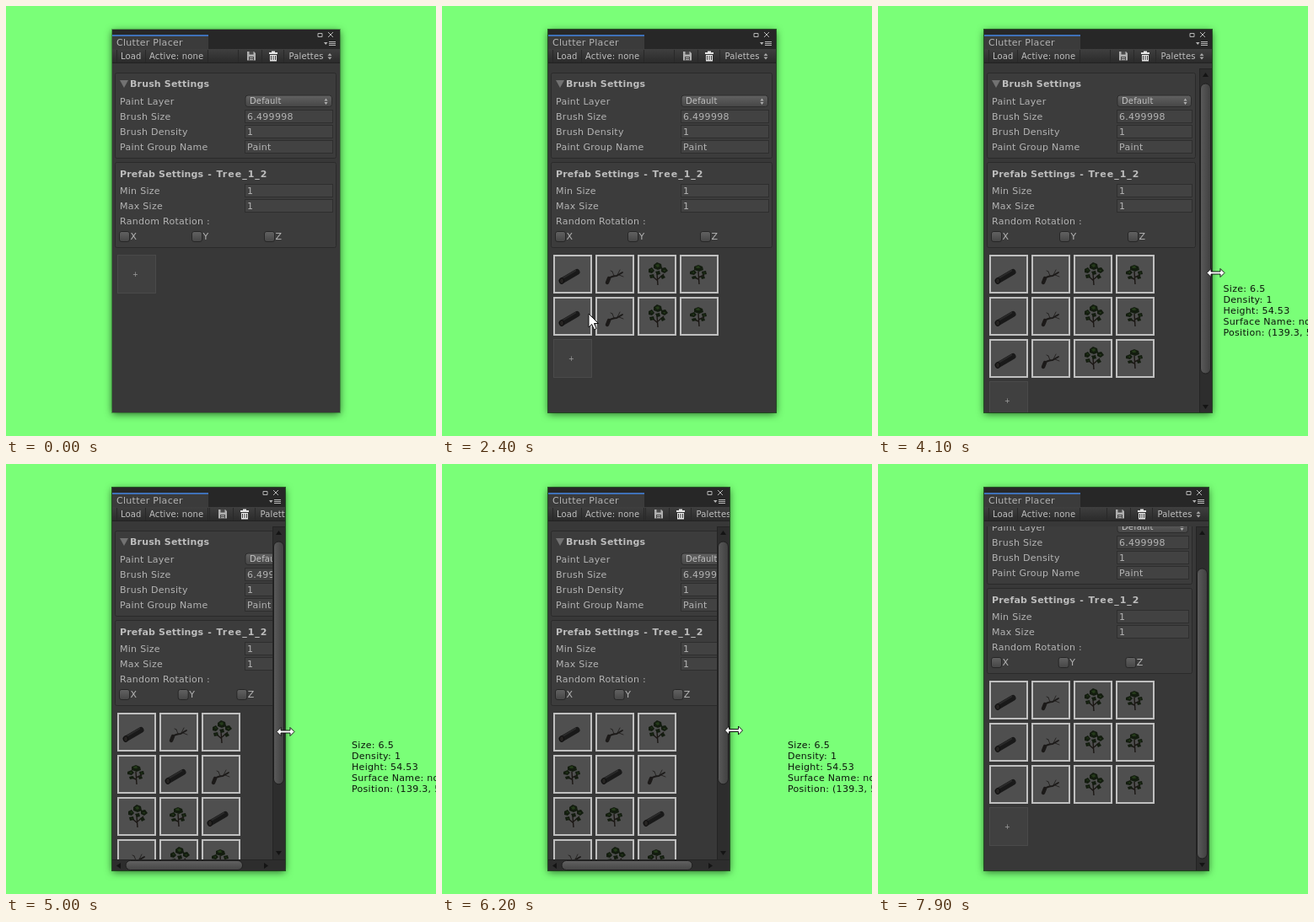
An HTML page that plays this animation: 510 by 510 pixels, repeating every 8 s.

```html
<!DOCTYPE html>
<html lang="en">
<head>
<meta charset="utf-8">
<title>Clutter Placer</title>
<style>
  html, body { margin: 0; width: 100%; height: 100%; overflow: hidden; background: #7aff78; }
  svg { display: block; width: 510px; height: 510px; }
  text { font: 11px "DejaVu Sans", Verdana, sans-serif; letter-spacing: .28px; fill: #b4b4b4; white-space: pre; }
  .bold { font-weight: bold; letter-spacing: .17px; fill: #bdbdbd; }
  .wide { letter-spacing: 1px; }
  .small { font-size: 10px; letter-spacing: .15px; fill: #c0c0c0; }
  .sign { font-size: 8px; fill: #a0a0a0; }
  #tip text { fill: #0b160b; letter-spacing: .3px; }
  .box { fill: #3c3c3c; stroke: #2a2a2a; }
  .field { fill: #424242; stroke: #2e2e2e; }
  .check rect { fill: url(#knob); stroke: #262626; }
  .bar { fill: #2d2d2d; stroke: #242424; }
  .thumb { stroke: #1f1f1f; }
  .arrow { fill: #141414; }
  #shade { fill: #383838; filter: drop-shadow(0 2px 5px rgba(0, 20, 0, .65)); }
</style>
</head>
<body>
<svg viewBox="0 0 510 510">
  <defs>
    <linearGradient id="tool" x2="0" y2="1"><stop stop-color="#3f3f3f"/><stop offset="1" stop-color="#2b2b2b"/></linearGradient>
    <linearGradient id="knob" x2="0" y2="1"><stop stop-color="#626262"/><stop offset="1" stop-color="#464646"/></linearGradient>
    <linearGradient id="grip"><stop stop-color="#5a5a5a"/><stop offset="1" stop-color="#404040"/></linearGradient>
    <clipPath id="winClip"><rect id="winRect" x="126" y="28" height="454"/></clipPath>
    <clipPath id="viewClip"><rect id="viewRect" x="125" y="74"/></clipPath>
    <clipPath id="tabClip"><rect id="tabRect" x="126" y="34" height="18"/></clipPath>
    <g id="log">
      <path d="M10 31L28 20.500" stroke="#191919" stroke-width="7" stroke-linecap="round"/>
      <path d="M11 28L27 18.500" stroke="#2b2b2b" stroke-width="1.500"/>
      <ellipse cx="10" cy="31" rx="2.500" ry="3.500" fill="#262422" stroke="#0e0e0e"/>
    </g>
    <g id="twig" fill="none" stroke="#1c1a19" stroke-linecap="round">
      <path d="M14 33L16 28" stroke-width="4.500"/>
      <path d="M15 28Q21 25 25 25L32 21" stroke-width="1.800"/>
      <path d="M22 25L20 20M26 24L29 18M28 24L33 26M20 20L18 19" stroke-width=".8"/>
    </g>
    <g id="treeA">
      <path d="M24 36L23 22M24 31L17 25M24 29L31 23" fill="none" stroke="#1b1714" stroke-width="1.400"/>
      <path d="M19 12l4-3 5 2 1 5-5 2-5-2zM13 17l4-2 3 4-3 3-4-1zM28 16l5-1 3 4-4 3-4-2zM21 20l5-1 1 4-4 1zM14 24l5-1 1 4-5 1zM27 25l4-1 2 3-4 2z" fill="#131c0f"/>
      <path d="M21 12l4-1 1 3-3 1zM15 18l2-1 1 2zM30 18l3 0-1 2zM16 25l2 0 0 1z" fill="#243a1a"/>
    </g>
    <g id="treeB">
      <path d="M23 35L22 20M22 29L16 26M22 27L29 24" fill="none" stroke="#1b1714" stroke-width="1.400"/>
      <path d="M17 14l5-2 5 2 1 4-5 2-6-2zM12 20l5-2 3 3-3 3-5-1zM26 20l5-1 1 4-5 1zM14 26l5-1 1 3-5 1zM25 26l4-1 1 3-4 1z" fill="#131c0f"/>
      <path d="M19 14l4-1 1 3-4 0zM14 21l3-1 0 2zM28 21l2 0-1 2z" fill="#243a1a"/>
    </g>
  </defs>

  <rect width="510" height="510" fill="#7aff78"/>
  <g id="tip"></g>
  <rect id="shade" x="126" y="28" height="454"/>
  <rect id="edge" x="125.500" y="27.500" height="455" fill="none" stroke="#0c200c"/>

  <g clip-path="url(#winClip)">
    <rect x="125" y="27" width="280" height="24" fill="#272727"/>
    <g clip-path="url(#tabClip)">
      <rect x="126" y="34" width="114" height="18" fill="#3b3b3b"/>
      <rect x="126" y="34" width="114" height="2" fill="#3f71b8"/>
      <text x="131" y="47">Clutter Placer</text>
    </g>
    <path id="chevron" d="M-40 36l5 5.500-5 5.500" fill="none" stroke="#909090" stroke-width="1.500"/>
    <rect x="125" y="51" width="280" height="16" fill="url(#tool)"/>
    <path d="M125 67.500h280" stroke="#222"/>
    <path d="M131.500 52v15M165.500 52v15M239.500 52v15" stroke="#282828"/>
    <text class="small" x="136" y="63">Load</text>
    <text class="small" x="170" y="63">Active: none</text>

    <g id="corner">
      <path d="M-26 32.500h5v4h-5zM-14 31l6 6M-8 31l-6 6M-13 42.500h8M-13 44.500h8M-13 46.500h8" fill="none" stroke="#b5b5b5"/>
      <path d="M-19 43h4.500l-2.250 3z" fill="#b5b5b5"/>
    </g>
    <g id="tools">
      <path d="M-120.500 52v15M-92.500 52v15M-66.500 52v15" stroke="#292929"/>
      <path d="M-110 54h8l2 2v8.500h-10z" fill="#b0b0b0"/>
      <path d="M-107.500 54h5v3.500h-5zM-108 60h6v4.500h-6z" fill="#4a4a4a"/>
      <path d="M-107 61.500h4M-107 63.500h4" stroke="#b0b0b0"/>
      <path d="M-84 55h3v-1.500h4V55h3v2h-10zM-83 58h8v7.500h-8z" fill="#e6e6e6"/>
      <path d="M-81.500 59v5M-79 59v5M-76.500 59v5" stroke="#3a3a3a"/>
      <text class="small" x="-60.500" y="63">Palettes</text>
      <path d="M-14.500 59h5l-2.500-3zM-14.500 60.500h5l-2.500 3z" fill="#a5a5a5"/>
    </g>

    <g clip-path="url(#viewClip)"><g id="content">
      <rect class="box" x="129.500" y="79.500" height="101" rx="2"/>
      <rect class="box" x="129.500" y="185.500" height="101" rx="2"/>
      <path d="M135 88h10l-5 9z" fill="#727272"/>
      <text class="bold" x="147" y="96">Brush Settings</text>
      <text class="bold" x="135" y="203">Prefab Settings<tspan class="wide"> - Tree_1_2</tspan></text>
      <text x="135" y="259">Random Rotation :</text>
      <g id="rows"></g>
      <rect id="drop" x="284" y="106" height="13.500" rx="3" fill="url(#knob)" stroke="#2c2c2c"/>
      <text class="small" x="289" y="116">Default</text>
      <path id="dropMark" d="M-11.500 112.500h4l-2-3zM-11.500 114h4l-2 3z" fill="#b0b0b0"/>
      <g id="checks"></g>
      <g id="cells"></g>
      <g id="plus">
        <rect x=".5" y=".5" width="45" height="45" fill="#404040" stroke="#4a4a4a"/>
        <text class="sign" x="18" y="26">+</text>
      </g>
    </g></g>

    <g id="barV">
      <rect class="bar" x="-14.500" y="74.500" width="15" height="409"/>
      <path class="arrow" d="M-11 84h7l-3.500-5z"/>
      <path class="arrow" id="downMark" d="M-11 -3h7l-3.500 5z"/>
      <rect class="thumb" id="thumbV" x="-13.500" width="12" rx="6" fill="url(#grip)"/>
    </g>
    <g id="barH">
      <rect class="bar" x="125.500" y="469.500" width="280" height="14"/>
      <path class="arrow" d="M136 473v7l-5-3.500z"/>
      <path class="arrow" id="rightMark" d="M-25 473v7l5-3.500z"/>
      <rect class="thumb" id="thumbH" x="142" y="470.500" height="11" rx="5.500" fill="url(#knob)"/>
    </g>
  </g>

  <path id="pointer" d="M0 0v16l3.700-3.500 2.700 6.300 2.800-1.200-2.700-6.100h5z" fill="#fff" stroke="#111"/>
  <path id="resizer" d="M-10.500 0l5-5v3.500h11V-5l5 5-5 5V1.500h-11V5z" fill="#fff" stroke="#111"/>
</svg>

<script>
const $ = id => document.getElementById(id);
const set = (id, attrs) => { for (const k in attrs) $(id).setAttribute(k, attrs[k]); };
const move = (id, x, y = 0) => set(id, { transform: `translate(${x} ${y})` });
const show = (id, on) => { $(id).style.display = on ? '' : 'none'; };

$('tip').innerHTML = ['Size: 6.5', 'Density: 1', 'Height: 54.53', 'Surface Name: none', 'Position: (139.3, 54.5, 33.7)']
  .map((s, i) => `<text y="${4 + 13 * i}">${s}</text>`).join('');

$('rows').innerHTML = [
  ['Paint Layer', 113], ['Brush Size', 131, '6.499998'], ['Brush Density', 149, '1'],
  ['Paint Group Name', 167, 'Paint'], ['Min Size', 219, '1'], ['Max Size', 237, '1']
].map(([label, y, value]) => `<text x="135" y="${y + 4}">${label}</text>` + (value
  ? `<rect class="field" x="283.5" y="${y - 7.5}" height="15"/><text x="286" y="${y + 4}">${value}</text>` : '')).join('');

$('checks').innerHTML = [...'XYZ'].map(c =>
  `<g class="check"><rect x="134.5" y="267.5" width="12" height="12" rx="2.5"/><text x="147.5" y="277">${c}</text></g>`).join('');

const icons = ['log', 'twig', 'treeA', 'treeB'];
$('cells').innerHTML = Array.from({ length: 12 }, (_, i) =>
  `<g><rect x="1" y="1" width="44" height="44" fill="#4f4f4f" stroke="#c0c0c0" stroke-width="2"/><use href="#${icons[i % 4]}"/></g>`).join('');

const cells = [...$('cells').children];
const checks = [...$('checks').children];
const boxes = document.querySelectorAll('.box');
const fields = document.querySelectorAll('.field');

// Keys are [time, ...values], joined by straight lines.
const edgeKeys = [[4300, 396], [5000, 331], [5600, 236], [5800, 239], [6400, 392]];
const scrollKeys = [[6900, 0], [7100, 38]];
const mouseKeys = [
  [400, 172, 560], [500, 172, 322], [900, 174, 326], [1300, 190, 520], [1800, 185, 520],
  [2200, 172, 364], [2400, 174, 365], [2700, 188, 520], [3000, 188, 520], [3300, 174, 412],
  [3600, 180, 412], [3900, 400.5, 316.5], [4300, 400.5, 316.5], [5000, 331.5, 317.5],
  [5600, 243, 316], [5800, 246, 316], [6400, 396, 316], [6800, 315, 344],
  [7200, 308, 352], [7600, 262, 520]
];
const dropTimes = [500, 2200, 3300];

function at(keys, t) {
  const n = keys.findIndex(k => k[0] > t);
  if (n === 0) return keys[0].slice(1);
  if (n < 0) return keys[keys.length - 1].slice(1);
  const a = keys[n - 1], b = keys[n], p = (t - a[0]) / (b[0] - a[0]);
  return a.slice(1).map((v, i) => v + (b[i + 1] - v) * p);
}

function draw(t) {
  const [right] = at(edgeKeys, t), [scroll] = at(scrollKeys, t), [mx, my] = at(mouseKeys, t);
  const count = 4 * dropTimes.filter(d => t >= d).length;
  const width = right - 126;
  const cols = Math.floor(width / 56);
  const slot = i => [132 + 50 * (i % cols), 295 + 50 * Math.floor(i / cols)];
  const tall = slot(count)[1] + 2;          // content height, including padding
  const minRight = 362;                     // narrowest layout; below it the view scrolls sideways
  const hasH = right < minRight;
  const bottom = hasH ? 469 : 483;
  const hasV = tall > bottom - 74;
  const viewRight = right - (hasV ? 15 : 0);
  const layout = Math.max(right, minRight);
  const inner = layout - (hasV ? 15 : 0);

  for (const id of ['winRect', 'shade']) set(id, { width });
  // The outline is stronger once the window has focus.
  set('edge', { width: width + 1, 'stroke-opacity': count ? .7 : .3 });
  set('viewRect', { width: viewRight - 125, height: bottom - 74 });
  set('tabRect', { width: Math.min(114, right - 170) });
  show('chevron', right < 284);
  for (const id of ['chevron', 'corner', 'barV', 'rightMark']) move(id, right);
  move('tools', layout);

  move('content', 0, -scroll);
  boxes.forEach(b => b.setAttribute('width', inner - 134));
  fields.forEach(f => f.setAttribute('width', inner - 292));
  set('drop', { width: inner - 293.5 });
  move('dropMark', inner - 7);
  checks.forEach((c, i) => c.setAttribute('transform', `translate(${i * (inner - 138) / 3})`));
  cells.forEach((c, i) => {
    c.style.display = i < count ? '' : 'none';
    c.setAttribute('transform', `translate(${slot(i)})`);
  });
  move('plus', ...slot(count));

  show('barV', hasV);
  show('barH', hasH);
  const track = bottom - 107;
  set('thumbV', { y: 92 + track * scroll / tall, height: track * Math.min(1, (bottom - 74) / tall) });
  move('downMark', 0, bottom - 7);
  set('thumbH', { width: (right - 170) * Math.min(1, (viewRight - 125) / (inner - 125)) });

  const sizing = t >= 3900 && t <= 6400;
  show('pointer', !sizing);
  show('resizer', sizing);
  move(sizing ? 'resizer' : 'pointer', mx, my);
  // The readout follows the mouse but stays put during the drag.
  if (t > 4300 && t <= 6400) move('tip', 410, 333);
  else move('tip', mx + 9, my + 18);
}

const start = performance.now();
function tick() {
  const t = Math.max(0, performance.now() - start) % 8000;
  draw(Math.floor(t / 100) * 100);
  requestAnimationFrame(tick);
}
draw(0);
requestAnimationFrame(tick);
</script>
</body>
</html>
```
